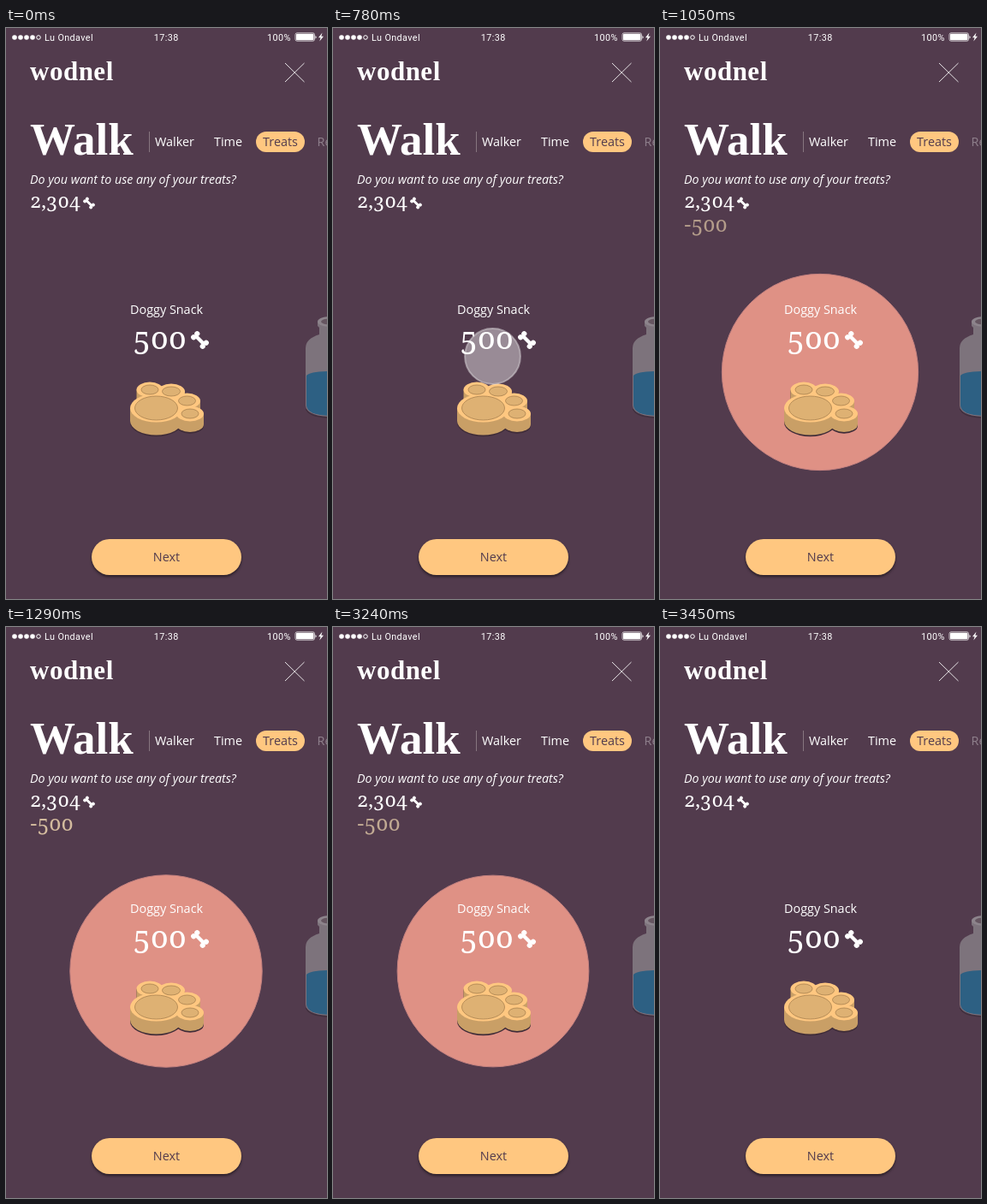
Animation of 375 by 667 pixels, one loop 4530 ms. Source, as an HTML page:

```html
<!DOCTYPE html>
<html lang="en">
<head>
<meta charset="utf-8">
<title>Treats</title>
<style>
  html, body { margin: 0; height: 100%; overflow: hidden; background: #523b4d; }
  svg { display: block; width: 375px; height: 667px; }
  text { font: 500 14.4px "Open Sans", "Noto Sans", sans-serif; fill: #fff; }
  .status { font: 10.8px Roboto, sans-serif; letter-spacing: .4px; }
  .display { font: bold 53px "Liberation Serif", serif; }
  .brand { font-size: 31px; letter-spacing: .5px; }
  .question { font-size: 14.27px; font-style: italic; font-weight: 400; }
  .number { font: 23px "Noto Serif", serif; font-variant-numeric: oldstyle-nums; }
  .price { font-size: 36.5px; font-weight: 500; }
  .cost { font-size: 24.5px; font-weight: 500; fill: #d3bb9e; }
  .dark { fill: #523b4d; }
  .middle { text-anchor: middle; }
  #button { filter: drop-shadow(0 2px 1.5px rgba(0, 0, 0, .5)); }
</style>
</head>
<body>
<svg viewBox="0 0 375 667">
  <defs>
    <g id="bone" fill="#fff" transform="rotate(45)">
      <path d="M-8 0H8" stroke="#fff" stroke-width="4.6"/>
      <circle cx="-8" cy="-3.1" r="3.3"/><circle cx="-8" cy="3.1" r="3.3"/>
      <circle cx="8" cy="-3.1" r="3.3"/><circle cx="8" cy="3.1" r="3.3"/>
    </g>
  </defs>
  <rect width="375" height="667" fill="#523b4d"/>

  <g fill="#fff">
    <circle cx="10" cy="11" r="2.8"/><circle cx="17" cy="11" r="2.8"/>
    <circle cx="24" cy="11" r="2.8"/><circle cx="31" cy="11" r="2.8"/>
    <circle cx="38" cy="11" r="2.3" fill="none" stroke="#fff"/>
    <rect x="338" y="5.8" width="22.5" height="9.4" rx="2" fill="none" stroke="#fff" stroke-width=".7"/>
    <rect x="339" y="6.8" width="20.5" height="7.4" rx="1"/>
    <path d="M361.5 9a2 2 0 0 1 0 3.6zM369.5 5.5L365 11.2H367.6L366.3 15.5L371 9.7H368.3z"/>
  </g>
  <text class="status" x="45" y="15">Lu Ondavel</text>
  <text class="status middle" x="187.3" y="15">17:38</text>
  <text class="status" x="305" y="15">100%</text>

  <text class="display brand" x="28" y="60.5">wodnel</text>
  <path d="M326 41L348.5 63M348.5 41L326 63" stroke="#fff" stroke-opacity=".85"/>
  <text class="display" x="28" y="148">Walk</text>
  <path d="M167.5 121V145" stroke="#86757f"/>
  <text x="174" y="138">Walker</text>
  <text x="243" y="138">Time</text>
  <rect x="292" y="121" width="57" height="24" rx="12" fill="#ffc780"/>
  <text class="dark middle" x="320.5" y="138">Treats</text>
  <text x="363.5" y="138" opacity=".35">Review</text>

  <text class="question" x="28" y="182">Do you want to use any of your treats?</text>
  <text class="number" x="28" y="210">2,304</text>
  <use href="#bone" transform="translate(97 204.5) scale(.62)"/>
  <text id="cost" class="number cost" x="28.5" y="238">-500</text>

  <g>
    <path d="M350.5 445Q354 454.5 378 455" fill="none" stroke="#40303e" stroke-width="1.5"/>
    <path d="M364 343V348L366 350V358Q350 363 350 374V441Q351 453 378 454V343z" fill="#7d737c"/>
    <path d="M351 406Q355 401.5 378 401V453Q352 452 351 441z" fill="#2d6083"/>
    <ellipse cx="378" cy="343" rx="14" ry="6" fill="#8d848c"/>
    <ellipse cx="378" cy="343" rx="10" ry="3.5" fill="#665661"/>
  </g>

  <circle id="disc" cx="187" cy="402" fill="#df9185" stroke="#c58280"/>
  <text class="middle" x="187.5" y="334">Doggy Snack</text>
  <text class="number price" x="147.5" y="374.5">500</text>
  <use href="#bone" transform="translate(226.5 364.5) scale(.93)"/>
  <g id="paw"></g>

  <g id="button">
    <rect x="100" y="597" width="175" height="42" rx="21" fill="#ffc780"/>
  </g>
  <text class="dark middle" x="187.5" y="623">Next</text>
  <circle id="touch" cx="186.5" cy="383.5" fill="#fff" fill-opacity=".55" stroke="#fff" stroke-opacity=".55" stroke-width="2"/>
</svg>
<script>
const LOOP = 4530, STEP = 30;
const $ = id => document.getElementById(id);
const clamp = v => Math.min(1, Math.max(0, v));
const progress = (t, start, length) => clamp((t - start) / length);

// Each pad: centre x, centre y, radii, inner radii, depth
const pads = [
  [168, 422.5, 15.5, 9, 10, 5.5, 12],
  [193, 424.5, 16, 9, 10.5, 5.5, 12],
  [211.5, 435.5, 15.5, 9, 10, 5.5, 12],
  [215, 450.5, 16, 9, 10, 5.5, 12.5],
  [175.5, 444, 30.5, 16.5, 25, 14, 15]
];
const columns = (color, extra) => pads.map(([x, y, rx, ry, , , depth]) =>
  `<path fill="${color}" d="M${x - rx} ${y}v${depth + extra}a${rx} ${ry} 0 0 0 ${2 * rx} 0V${y}z"/>`).join('');
$('paw').innerHTML = columns('#3f2c38', 1.7) + columns('#c99f66', 0) +
  pads.map(([x, y, rx, ry]) =>
    `<ellipse cx="${x}" cy="${y}" rx="${rx}" ry="${ry}" fill="#ffc780"/>`).join('') +
  pads.map(([x, y, , , rx, ry]) =>
    `<ellipse cx="${x}" cy="${y}" rx="${rx}" ry="${ry}" fill="#deb173" stroke="#a98250" stroke-width=".8"/>`).join('');

// Damped spring with a 2% overshoot after 150 ms
function spring(ms) {
  const s = Math.max(0, ms) / 150, angle = s * Math.PI;
  return 1 - Math.exp(-3.816 * s) * (Math.cos(angle) + 1.215 * Math.sin(angle));
}

function drawTouch(t, start) {
  const press = t < start ? 0 : progress(t, start - STEP, 180);
  const release = progress(t, start + 300, 120);
  $('touch').setAttribute('r', 30.5 * (1 + .25 * release));
  $('touch').setAttribute('opacity', press * (1 - release));
}

function draw(t) {
  drawTouch(t, t < 2000 ? 450 : 2730);

  // The treat reacts shortly after each release
  const enter = spring(t - 905), leave = progress(t, 3205, 245);
  const shown = enter - leave ** 3;
  $('disc').setAttribute('r', Math.max(0, 112.2 * shown));
  $('disc').setAttribute('visibility', shown > 0 ? 'visible' : 'hidden');

  const fade = 1 - (1 - progress(t, 905, 385)) ** 3;
  $('cost').setAttribute('transform', `translate(0 ${20 * (shown - 1)})`);
  $('cost').setAttribute('opacity', fade * (1 - leave));
}

function tick() {
  const t = performance.now() % LOOP;
  draw(Math.floor(t / STEP) * STEP);
  requestAnimationFrame(tick);
}
tick();
</script>
</body>
</html>
```
